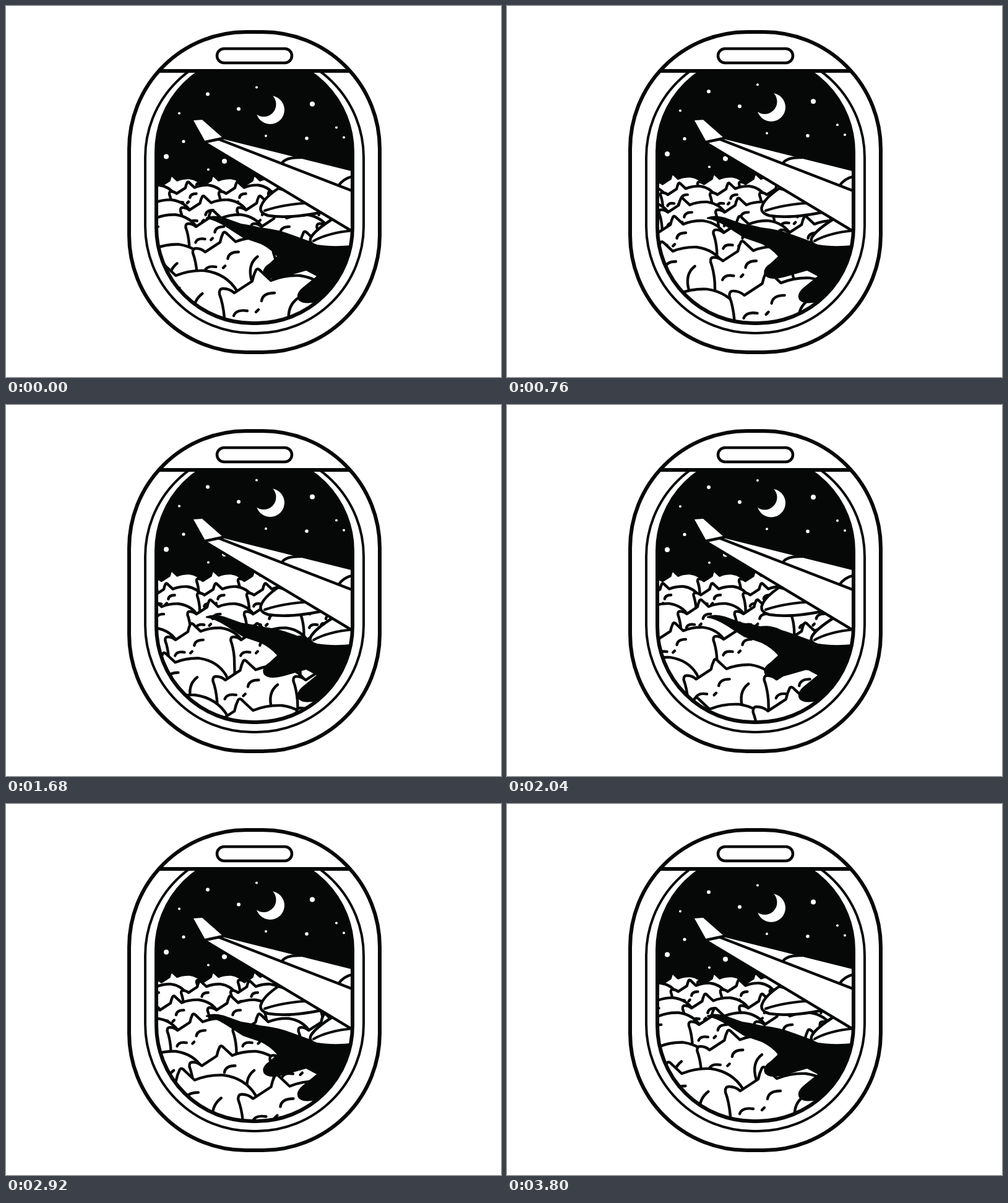
An HTML page with a canvas for the animation above (3.84 s loop, 800 px wide and 600 px high).

```html
<!DOCTYPE html>
<html lang="en">
<head>
<meta charset="utf-8">
<title>Window seat</title>
<style>
html, body { margin: 0; width: 100%; height: 100%; overflow: hidden; background: #fff; }
canvas { display: block; }
</style>
</head>
<body>
<canvas id="stage" width="800" height="600"></canvas>
<script>
const ctx = document.getElementById('stage').getContext('2d');
const INK = '#050807', PAPER = '#fff';
const LOOP = 3840, STEP = 40;

const body = new Path2D('M10 120L8 48Q6 25 0 9Q-1 0 6 0Q16 0 24 7L53-12Q55-22 59-30Q62-34 67-28L83-13Q105-22 130-21Q165-16 182 12Q196 40 196 120Z');
const face = new Path2D('M68 20Q70 7 89 7M23 44Q27 33 45 36M59 38L63 34');
const tail = new Path2D('M126 16Q105 32 115 65');

// Rows from far to near: cats per loop, spacing, scale, start, vertical sway, per-cat offsets
const rows = [
  { n: 0, gap: 67, s: .43, x: 241, y: 287, sway: -6 },
  { n: 1, gap: 80, s: .49, x: 264, y: 300, sway: 4 },
  { n: 2, gap: 91.5, s: .596, x: 282, y: 326, sway: 8 },
  { n: 3, gap: 106, s: .69, x: 290.5, y: 352, sway: 23 },
  { n: 4, gap: 130, s: .83, x: 302, y: 392, sway: 36, dy: [0, -1, 11, 11] },
  { n: 5, gap: 153.6, s: 1, x: 345, y: 457, sway: 51, dx: [0, 13, 0, 0, 0], dy: [0, -18, -1, -18, -8] }
];

const stars = [
  [326, 142.5, 3], [405, 131.5, 2], [376, 166.5, 3], [495, 158.5, 4], [280, 173.5, 2],
  [287, 219, 2.6], [259, 243.5, 4], [353, 251, 4], [327, 264.5, 2], [420, 210, 2],
  [486, 214, 2.8], [534, 196.5, 2], [546, 212.5, 2]
];

const shadow = new Path2D('M323 342Q335 337 352 342L380 352Q395 354 410 358Q440 361 465 371L495 382L565 385V520H515L503 478Q482 484 473 476Q466 466 481 454L502 437L485 428L450 438Q425 445 417 436Q411 426 426 416L438 405Q428 393 412 385L383 375L355 357Q338 346 323 344Z');
const pods = new Path2D('M440 295Q418 310 413 322Q407 334 424 339Q460 345 522 331L500 310ZM530 343Q500 362 493 374Q488 384 502 388Q530 393 570 388V350Z');
const podLines = new Path2D('M418 331Q450 320 497 318M497 380Q520 367 560 363');
const wing = new Path2D('M322 219L350 215L570 270V368Z');
const wingLines = new Path2D('M340 214L570 303M446 254Q453 244 477 245M538 290Q545 279 562 275');
const winglet = new Path2D('M303 185L317 184L350 213L322 219Z');
const wingletFold = new Path2D('M322 220L350 214');

function rounded(x, y, w, h, r) {
  const p = new Path2D();
  p.roundRect(x, y, w, h, r);
  return p;
}
const outer = rounded(199, 42, 405, 518, 189);
const rim = rounded(225, 72, 353, 457, 173);
const pane = rounded(243, 81, 317, 432, 155);
const handle = rounded(341, 69, 121, 23, 11.5);

function fill(path, color) {
  ctx.fillStyle = color;
  ctx.fill(path);
}
function line(path, width) {
  ctx.lineWidth = width;
  ctx.stroke(path);
}
function disc(x, y, r, color) {
  ctx.fillStyle = color;
  ctx.beginPath();
  ctx.arc(x, y, r, 0, 2 * Math.PI);
  ctx.fill();
}
function ease(v) {
  v = Math.min(1, Math.max(0, v));
  return v * v * (3 - 2 * v);
}

function drawRow({ n, gap, s, x: x0, y: y0, sway, dx, dy }, t, lift) {
  const width = 4.4 / s;
  for (let k = -3; k < 12; k++) {
    const i = n ? (k + n) % n : 0;
    const x = x0 + gap * (k - n * t / LOOP) + (dx ? dx[i] : 0);
    if (x < 20 || x > 570) continue;
    ctx.save();
    ctx.translate(x, y0 + lift * sway + (dy ? dy[i] : 0));
    ctx.scale(s, s);
    fill(body, PAPER);
    line(body, width);
    if (n > 0) line(face, width);
    if (n > 3) line(tail, width);
    ctx.restore();
  }
}

function draw(t) {
  const lift = ease(t / 1680) - ease((t - 1800) / 1980);

  fill(new Path2D('M0 0H800V600H0Z'), PAPER);
  ctx.strokeStyle = INK;
  ctx.lineCap = ctx.lineJoin = 'round';

  ctx.save();
  ctx.clip(pane);
  fill(pane, INK);
  for (const [x, y, r] of stars) disc(x, y - 10 * lift, r, PAPER);
  disc(427, 168 - 10 * lift, 23, PAPER);
  disc(416.5, 159 - 10 * lift, 20, INK);
  for (const row of rows) drawRow(row, t, lift);
  fill(shadow, INK);
  fill(pods, PAPER);
  line(pods, 4.5);
  line(podLines, 4);
  line(wing, 9);
  fill(wing, PAPER);
  line(wingLines, 4.5);
  fill(winglet, PAPER);
  line(wingletFold, 4.5);
  ctx.restore();

  line(pane, 6);
  line(rim, 4);

  // Raised shade covers the top of the window
  ctx.save();
  ctx.clip(outer);
  fill(new Path2D('M190 30H610V105H190Z'), PAPER);
  line(new Path2D('M190 105H610'), 6);
  ctx.restore();
  line(handle, 4.5);
  line(outer, 6);
}

function tick() {
  const t = performance.now() % LOOP;
  draw(Math.floor(t / STEP) * STEP);
  requestAnimationFrame(tick);
}
tick();
</script>
</body>
</html>
```
